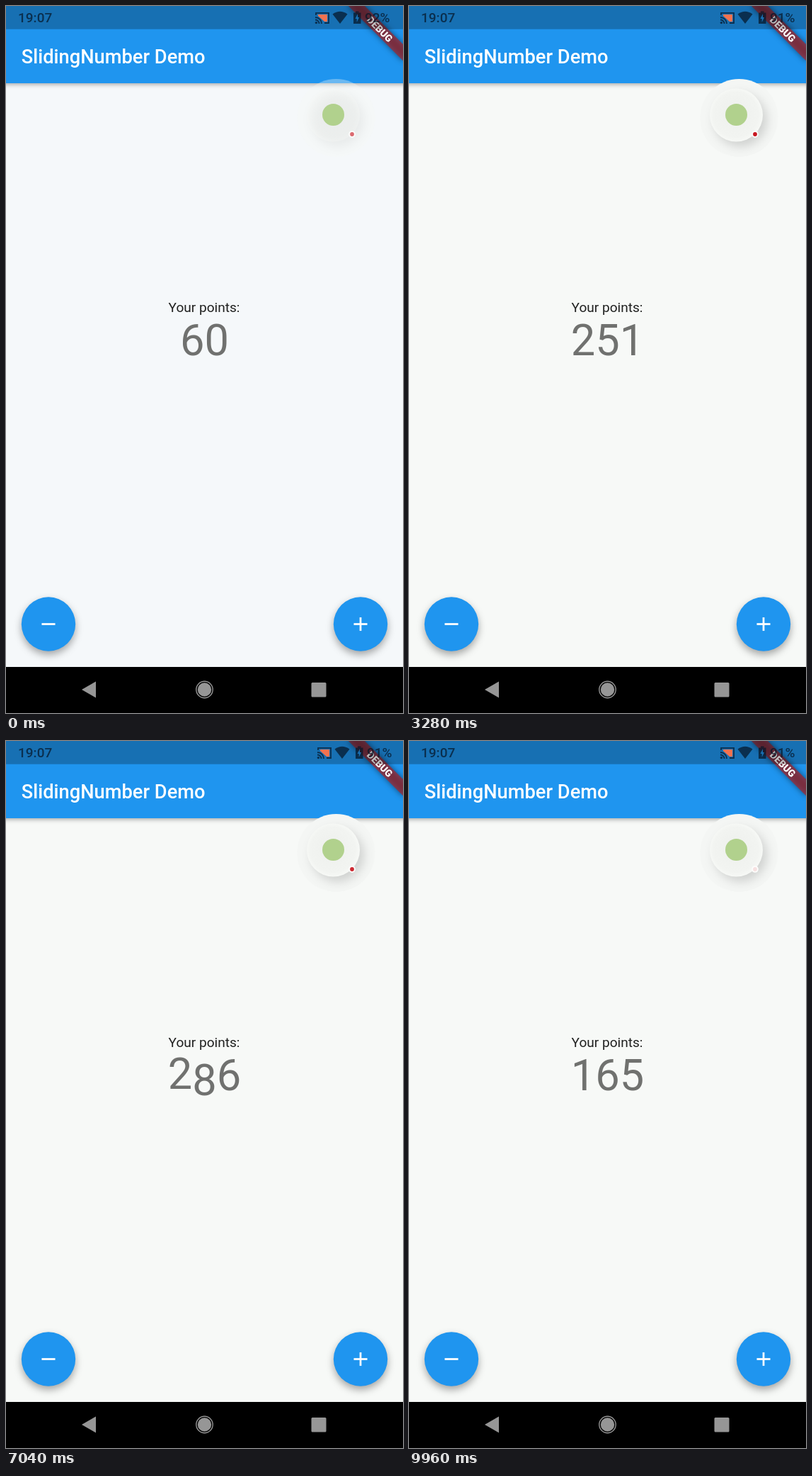
Animation of 561x998 px, one loop 10000 ms. Source, as an HTML page with a canvas:

```html
<!DOCTYPE html>
<html lang="en">
<head>
<meta charset="utf-8">
<title>SlidingNumber Demo</title>
<style>
html, body { margin: 0; width: 100%; height: 100%; overflow: hidden; background: #f7f9f7; }
canvas { display: block; }
</style>
</head>
<body>
<canvas id="stage" width="561" height="998"></canvas>
<script>
const ctx = document.getElementById('stage').getContext('2d');
const W = 561, H = 998, LOOP = 10000, DP = W / 411.43;
const BLUE = '#1f95ef', TAU = Math.PI * 2;

// Each step: [start time, new score]
const SCORES = [
  [-2000, 60], [90, 158], [666, 229], [2000, 251], [3400, 255],
  [3920, 302], [5271, 336], [6500, 286], [7736, 231], [8900, 165]
];
const SLIDE = 1000;
const CELL = { top: 436, height: 71.9, size: 45 * DP, width: 34.46, baseline: 492.9 };

const clamp = v => Math.min(1, Math.max(0, v));
const mix = (a, b, p) => a + (b - a) * p;
const easeOutQuint = p => 1 - (1 - p) ** 5;

function text(str, x, y, font, color, align = 'left') {
  ctx.font = font + ' Roboto, sans-serif';
  ctx.fillStyle = color;
  ctx.textAlign = align;
  ctx.fillText(str, x, y);
}

function rect(x, y, w, h, color) {
  ctx.fillStyle = color;
  ctx.fillRect(x, y, w, h);
}

function disc(x, y, r, color) {
  ctx.beginPath();
  ctx.arc(x, y, r, 0, TAU);
  ctx.fillStyle = color;
  ctx.fill();
}

function poly(points, color) {
  ctx.beginPath();
  points.forEach(([x, y]) => ctx.lineTo(x, y));
  ctx.closePath();
  ctx.fillStyle = color;
  ctx.fill();
}

function withShadow(color, blur, dx, dy, draw) {
  ctx.save();
  ctx.shadowColor = color;
  ctx.shadowBlur = blur;
  ctx.shadowOffsetX = dx;
  ctx.shadowOffsetY = dy;
  draw();
  ctx.restore();
}

function drawAppBar() {
  withShadow('rgba(0,0,0,.32)', 6, 0, 2, () => rect(-10, 0, W + 20, 109, BLUE));
  text('SlidingNumber Demo', 21.8, 81, `500 ${20 * DP}px`, '#fff');
}

function drawScore(t) {
  text('Your points:', W / 2 - 0.5, 431.5, `${14 * DP}px`, '#202120', 'center');

  let step = SCORES.length - 1;
  while (SCORES[step][0] > t) step--;
  const [start, to] = SCORES[step];
  const from = step ? SCORES[step - 1][1] : to;
  const p = easeOutQuint(clamp((t - start) / SLIDE));
  const digits = String(Math.max(from, to)).length;
  const left = W / 2 - digits * CELL.width / 2;

  ctx.save();
  ctx.beginPath();
  ctx.rect(0, CELL.top, W, CELL.height);
  ctx.clip();
  for (let i = 0; i < digits; i++) {
    const place = 10 ** (digits - 1 - i);
    const digit = n => Math.floor(n / place) % 10;
    const reel = mix(digit(from), digit(to), p);
    const first = Math.floor(reel + 1e-6);
    for (let d = first; d <= Math.min(9, first + 1); d++) {
      text(String(d), left + i * CELL.width, CELL.baseline + (d - reel) * CELL.height,
        `${CELL.size}px`, '#70716f');
    }
  }
  ctx.restore();
}

function drawRecorder(t) {
  const settled = clamp(t / 400);
  ctx.globalAlpha = mix(0.35, 1, settled);
  disc(466.5, 158, 55, '#f4f6f4');
  const shade = ctx.createRadialGradient(460, 150, 8, 462, 154, 38);
  shade.addColorStop(0, '#eff1ee');
  shade.addColorStop(0.8, '#f2f4f1');
  shade.addColorStop(1, '#f7f9f6');
  withShadow('rgba(0,0,0,.15)', 14, 6, 7, () => disc(462.5, 154, 37.5, shade));
  ctx.globalAlpha = 1;
  disc(462.5, 153.5, 15.5, '#b1d18d');

  const glow = 0.5 + 0.5 * Math.cos(TAU * (t - 3280) / 4140);
  disc(489, 181, 4.8, '#fdfdfc');
  disc(489, 181, 2.9, `rgba(200,22,32,${glow})`);
}

function drawActionButton(x, plus) {
  const y = 872.5, half = 7 * DP, thick = 2 * DP;
  withShadow('rgba(0,0,0,.34)', 11, 0, 5, () => disc(x, y, 28 * DP, BLUE));
  rect(x - half, y - thick / 2, half * 2, thick, '#fff');
  if (plus) rect(x - thick / 2, y - half, thick, half * 2, '#fff');
}

function drawBanner() {
  ctx.save();
  ctx.translate(W, 0);
  ctx.rotate(Math.PI / 4);
  const edge = 40 * DP, depth = 12 * DP;
  ctx.filter = 'blur(4px)';
  rect(-edge, edge - depth, edge * 2, depth, 'rgba(0,0,0,.5)');
  ctx.filter = 'none';
  rect(-edge, edge - depth, edge * 2, depth, 'rgba(183,28,28,.627)');
  text('DEBUG', 0, edge - depth / 2 + 4.9, `900 ${10.2 * DP}px`, '#fff', 'center');
  ctx.restore();
}

function drawCast(x, ink) {
  poly([[x + 4, 12], [x + 17, 12], [x + 17, 22], [x + 13, 22], [x + 4, 14]], '#f27250');
  ctx.strokeStyle = ink;
  ctx.lineWidth = 1.8;
  ctx.beginPath();
  ctx.moveTo(x + 1, 13);
  ctx.lineTo(x + 1, 9.8);
  ctx.lineTo(x + 19, 9.8);
  ctx.lineTo(x + 19, 24);
  ctx.lineTo(x + 13, 24);
  ctx.stroke();
  for (const r of [5.5, 9]) {
    ctx.beginPath();
    ctx.arc(x, 25, r, -Math.PI / 2, 0);
    ctx.stroke();
  }
  disc(x + 1.4, 23.6, 1.7, ink);
}

function drawStatusBar(t) {
  rect(0, 0, W, 24 * DP, 'rgba(0,0,0,.25)');
  const ink = 'rgba(5,22,40,.72)';
  const late = t >= 2100;
  const shift = late ? 3 : 0;
  text('19:07', 17, 23.3, '500 19px', ink);
  drawCast(437 + shift, ink);

  ctx.beginPath();
  ctx.moveTo(472 + shift, 25);
  ctx.lineTo(461.5 + shift, 11.5);
  ctx.quadraticCurveTo(472 + shift, 4, 482.5 + shift, 11.5);
  ctx.fillStyle = ink;
  ctx.fill();

  const x = 491 + shift;
  rect(x + 3, 7.5, 4.5, 2, ink);
  rect(x, 9.5, 10.5, 15.5, ink);
  poly([[x + 6, 11], [x + 2.5, 18], [x + 4.7, 18], [x + 4.7, 23], [x + 8, 16], [x + 6, 16]], '#1870b3');
  text(late ? '91%' : '92%', 507 + shift, 23.3, '500 19px', ink);
}

function drawNavBar() {
  const gray = '#969696';
  rect(0, 933, W, H - 933, '#000');
  poly([[107, 965], [127, 953.5], [127, 976.5]], gray);
  disc(280.5, 965, 9.7, gray);
  ctx.beginPath();
  ctx.arc(280.5, 965, 11.7, 0, TAU);
  ctx.strokeStyle = gray;
  ctx.lineWidth = 1.4;
  ctx.stroke();
  ctx.beginPath();
  ctx.roundRect(431.5, 955, 21, 20.5, 1.5);
  ctx.fillStyle = gray;
  ctx.fill();
}

function draw(t) {
  const p = clamp(t / 400);
  rect(0, 0, W, H, `rgb(${mix(245, 247, p)},${mix(248, 249, p)},${mix(250, 247, p)})`);
  drawAppBar();
  drawRecorder(t);
  drawScore(t);
  drawActionButton(60, false);
  drawActionButton(501, true);
  drawBanner();
  drawStatusBar(t);
  drawNavBar();
}

const began = performance.now();
function tick() {
  draw((performance.now() - began) % LOOP);
  requestAnimationFrame(tick);
}
tick();
</script>
</body>
</html>
```
